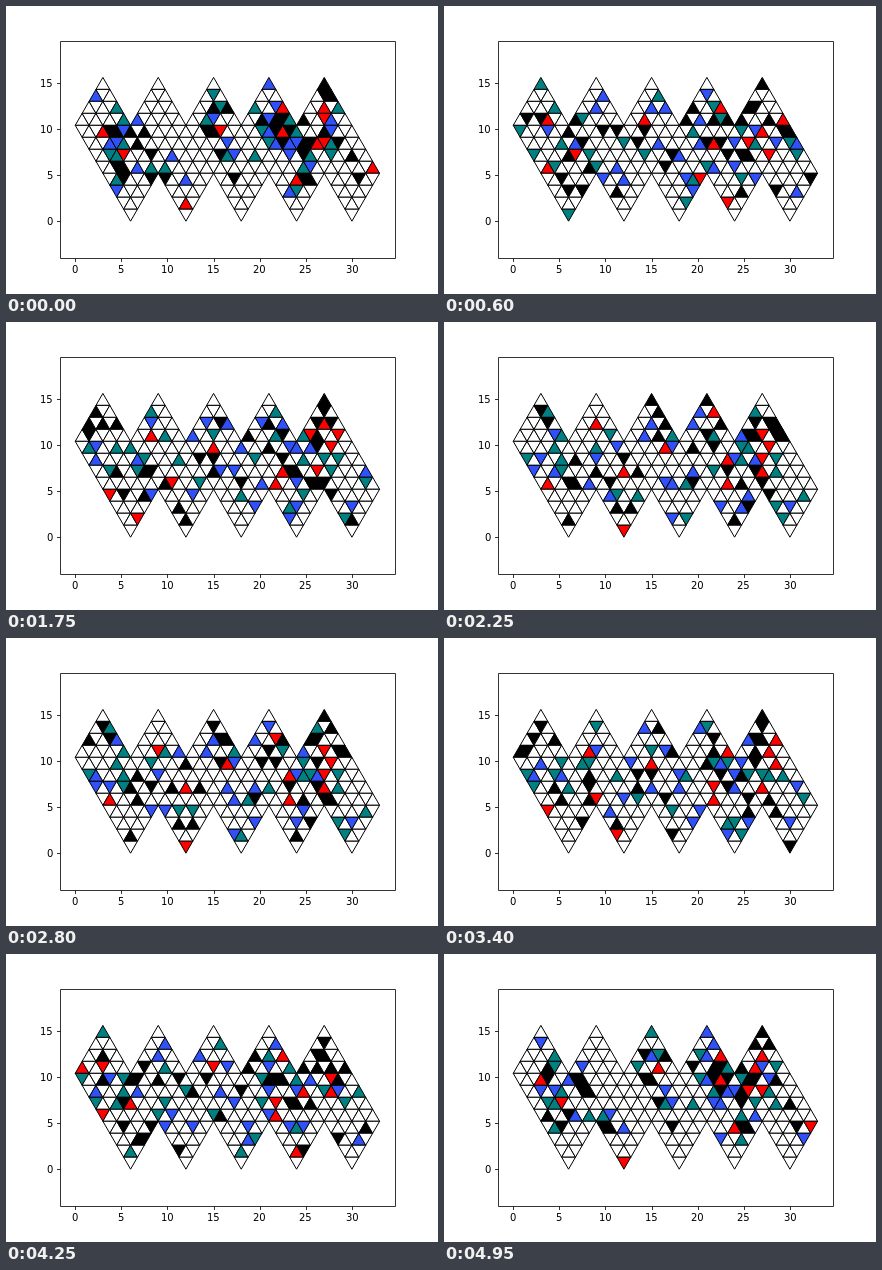
An HTML page for the animation above (5 s loop, 432 by 288 pixels).

```html
<!DOCTYPE html>
<html lang="en">
<head>
<meta charset="utf-8">
<title>Walkers on an icosahedron net</title>
<style>
  html, body { margin: 0; width: 100%; height: 100%; overflow: hidden; background: #fff; }
  svg { display: block; width: 432px; height: 288px; }
  text { font: 10px "DejaVu Sans", sans-serif; }
  .axes { fill: none; stroke: #000; stroke-width: .8; }
  .net { stroke: #000; stroke-width: 1; stroke-linejoin: round; }
</style>
</head>
<body>
<svg viewBox="0 0 432 288">
  <g id="net" class="net"></g>
  <path id="axes" class="axes"/>
  <g id="labels"></g>
</svg>
<script>
const STEP = 50, COUNT = 100, GROUPS = 12, HOP = 0.4;
const SCALE = 9.223, X0 = 69.22, Y0 = 215.2, TOP = 71.4;
const DX = SCALE * 0.75, DY = (Y0 - TOP) / 12;
const BLACK = '#000', BLUE = '#3050f8', TEAL = '#008080', RED = '#f00';
const GROUP = [RED, BLACK, BLUE, TEAL, BLACK, BLUE, TEAL, BLACK];

const $ = id => document.getElementById(id);
const svg = (name, attrs, parent) => {
  const el = document.createElementNS('http://www.w3.org/2000/svg', name);
  for (const key in attrs) el.setAttribute(key, attrs[key]);
  return parent.appendChild(el);
};

// Seeded, so every load plays the same loop.
let seed = 7;
const random = () => {
  seed = (seed * 1664525 + 1013904223) >>> 0;
  return seed / 4294967296;
};
const pick = list => list[Math.floor(random() * list.length)];

// A cell id is row * 100 + column; columns are half a triangle wide.
const cells = new Map();
const inBand = r => r > 3 && r < 8;
const halfWidth = r => r < 4 ? r : 11 - r;

function addCells(r, from, to) {
  for (let k = from; k <= to; k++) {
    const up = (r + k) % 2 === 0;
    const x = X0 + k * DX, y = TOP + r * DY;
    const tip = up ? y : y + DY, base = up ? y + DY : y;
    const points = `${x},${tip} ${x - DX},${base} ${x + DX},${base}`;
    cells.set(r * 100 + k, { r, k, up, el: svg('polygon', { points }, $('net')) });
  }
}

function buildNet() {
  for (let r = 0; r < 12; r++) {
    if (inBand(r)) {
      addCells(r, r - 3, r + 36);
      continue;
    }
    for (let lobe = 0; lobe < 5; lobe++) {
      const mid = (r < 4 ? 4 : 8) + lobe * 8;
      addCells(r, mid - halfWidth(r), mid + halfWidth(r));
    }
  }
  for (const [id, c] of cells) {
    c.near = [beside(c, -1), beside(c, 1), id + (c.up ? 100 : -100)]
      .filter(n => cells.has(n));
  }
}

// Side neighbour, crossing the seam to the next lobe where the net is cut.
function beside({ r, k }, dir) {
  const jump = inBand(r) ? 1 : 8 - 2 * halfWidth(r);
  return [k + dir, k + dir * jump, k + dir * (jump - 40)]
    .map(col => r * 100 + col)
    .find(id => cells.has(id));
}

// Loose groups, each with one red cell.
function scatter() {
  const state = new Map(), ids = [...cells.keys()];
  for (let i = 0; i < GROUPS; i++) {
    let id = pick(ids);
    for (const color of GROUP) {
      while (state.has(id)) id = pick(cells.get(id).near);
      state.set(id, color);
      for (let n = 0; n < 5; n++) id = pick(cells.get(id).near);
    }
  }
  return state;
}

// Each coloured cell now and then hops to a free neighbour.
function walk(state) {
  const next = new Map(state);
  for (const [id, color] of state) {
    if (random() > HOP) continue;
    const free = cells.get(id).near.filter(n => !next.has(n));
    if (!free.length) continue;
    next.delete(id);
    next.set(pick(free), color);
  }
  return next;
}

function drawAxes() {
  const snap = v => Math.round(v) + 0.5;
  const label = (x, y, text) =>
    svg('text', { x: Math.round(x), y: Math.round(y) }, $('labels')).textContent = text;
  const width = v => String(v).length * 6.36;
  let d = 'M54.5 35.5H389.5V252.5H54.5Z';
  for (let v = 0; v <= 30; v += 5) {
    const x = X0 + v * SCALE;
    d += `M${snap(x)} 252.5v3.5`;
    label(x - width(v) / 2, 267, v);
  }
  for (let v = 0; v <= 15; v += 5) {
    const y = Y0 - v * SCALE;
    d += `M54.5 ${snap(y)}h-3.5`;
    label(47 - width(v), y + 3.8, v);
  }
  $('axes').setAttribute('d', d);
}

drawAxes();
buildNet();

// The walk runs out and back, so the loop closes without a jump.
const states = [scatter()];
while (states.length <= COUNT / 2) states.push(walk(states[states.length - 1]));

let shown = -1;
function draw() {
  const index = Math.floor(performance.now() / STEP) % COUNT;
  if (index !== shown) {
    shown = index;
    const state = states[Math.min(index, COUNT - index)];
    for (const [id, c] of cells) c.el.setAttribute('fill', state.get(id) || '#fff');
  }
  requestAnimationFrame(draw);
}
draw();
</script>
</body>
</html>
```
